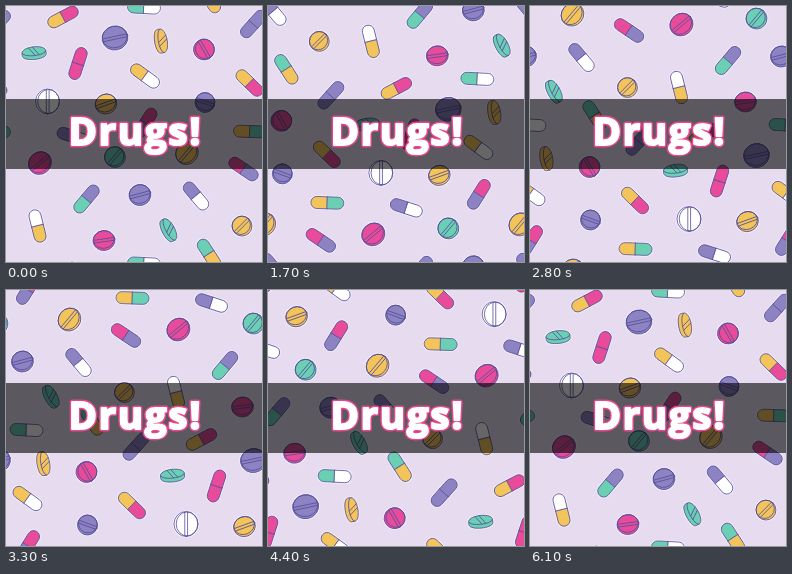
These frames come from a looping animation (256 by 256 pixels, 6200 ms). An HTML page:

```html
<!DOCTYPE html>
<html lang="en">
<head>
<meta charset="utf-8">
<title>Drugs!</title>
<style>
  /* animating a plain length keeps the pills sharp at fractional offsets */
  @property --shift { syntax: "<length>"; inherits: false; initial-value: 0px; }
  html, body { margin: 0; width: 100%; height: 100%; overflow: hidden; background: #e7dcef; }
  svg { display: block; width: 100vw; height: 100vh; }
  #field {
    transform: translate(var(--shift), var(--shift));
    animation: drift 6200ms steps(62) infinite;
  }
  #tile { stroke: #574f9c; stroke-width: .8; stroke-linejoin: round; stroke-linecap: round; }
  .halo { fill: none; stroke: #fff; stroke-width: 2.6; stroke-opacity: .5; }
  .line { fill: none; }
  text {
    font: 700 38px "Open Sans", "Noto Sans", sans-serif;
    letter-spacing: 2px; text-anchor: middle; stroke-linejoin: round;
  }
  .rim { fill: #e8468f; stroke: #e8468f; stroke-width: 5; }
  .face { fill: #fff; stroke: #fff; stroke-width: 2.2; }
  /* 61 steps cover one 256px tile; the last step lands on the start pose */
  @keyframes drift { to { --shift: 260.197px; } }
</style>
</head>
<body>
<svg viewBox="0 0 256 256">
  <defs><g id="tile"></g></defs>
  <rect width="256" height="256" fill="#e7dcef"/>
  <g id="field"></g>
  <rect y="93" width="256" height="70" fill="#000" fill-opacity=".6"/>
  <text class="rim" x="129.5" y="138.5">Drugs!</text>
  <text class="face" x="129.5" y="138.5">Drugs!</text>
</svg>
<script>
  const P = '#8d83c2', T = '#6bcfb4', K = '#e84b9a', Y = '#f3c45a', W = '#ffffff';

  // x, y, angle, leading colour, trailing colour
  const capsules = [
    [57, 11, -28, Y, K],
    [138, 1.5, 3, T, W],
    [247.5, 18, -48, P, P],
    [72, 57.5, -72, K, K],
    [139, 70, 36, Y, W],
    [243.5, 77, 44, Y, K],
    [139.5, 117, -58, P, K],
    [67, 130.5, 18, P, W],
    [244, 125.5, 2, Y, T],
    [237.5, 163, 34, K, P],
    [80.5, 193, -50, T, P],
    [190, 190, 50, P, W],
    [31.5, 220, 76, W, Y],
    [203, 248, 57, T, Y]
  ];

  // x, y, rx, ry, angle, colour
  const tablets = [
    [109, 32, 13, 12, -12, P],
    [198, 43.5, 10.5, 10.5, 60, K],
    [41.5, 95.5, 12.5, 12, 90, W],
    [100, 98, 11, 10, -20, Y],
    [199, 96.5, 10, 10, 20, P],
    [34, 157, 12, 11, -40, K],
    [109, 151, 10.5, 10.5, -50, T],
    [181, 147, 12, 11, -50, Y],
    [134, 189, 11, 10.5, -15, P],
    [98, 234.5, 11, 10, -8, K],
    [236, 220, 10, 10, -45, Y]
  ];

  // tablets seen from the side: x, y, angle, colour
  const tilted = [
    [28, 47, -6, T],
    [155, 35, 80, Y],
    [162.5, 224, 62, T]
  ];

  const place = (x, y, a, body) =>
    `<g transform="translate(${x} ${y}) rotate(${a})">${body}</g>`;

  const capsule = ([x, y, a, c1, c2]) => place(x, y, a,
    `<rect class="halo" x="-16.5" y="-6" width="33" height="12" rx="6"/>
     <path fill="${c1}" d="M0-6H-10.5a6 6 0 0 0 0 12H0z"/>
     <path fill="${c2}" d="M0-6H10.5a6 6 0 0 1 0 12H0z"/>`);

  const tablet = ([x, y, rx, ry, a, c]) => place(x, y, a,
    `<ellipse class="halo" rx="${rx}" ry="${ry}"/>
     <ellipse rx="${rx}" ry="${ry}" fill="${c}"/>
     <ellipse class="line" cy="-1" rx="${rx - .5}" ry="${ry - 1.2}"/>
     <path class="line" d="M${1 - rx}-1.6H${rx - 1}M${1 - rx} 1.2H${rx - 1}"/>`);

  const side = ([x, y, a, c]) => {
    const rim = 'd="M-12-1C-12-8 12-8 12-1V2C12 8-12 8-12 2z"';
    return place(x, y, a,
      `<path class="halo" ${rim}/><path fill="${c}" ${rim}/>
       <path class="line" d="M-12-1C-11 4 11 4 12-1M-5-5.5L1 2.5M-1-6L5 2.2"/>`);
  };

  document.getElementById('tile').innerHTML =
    capsules.map(capsule).join('') + tablets.map(tablet).join('') + tilted.map(side).join('');

  let copies = '';
  for (let i = -2; i < 2; i++)
    for (let j = -2; j < 2; j++)
      copies += `<use href="#tile" x="${i * 256}" y="${j * 256}"/>`;
  document.getElementById('field').innerHTML = copies;
</script>
</body>
</html>
```
